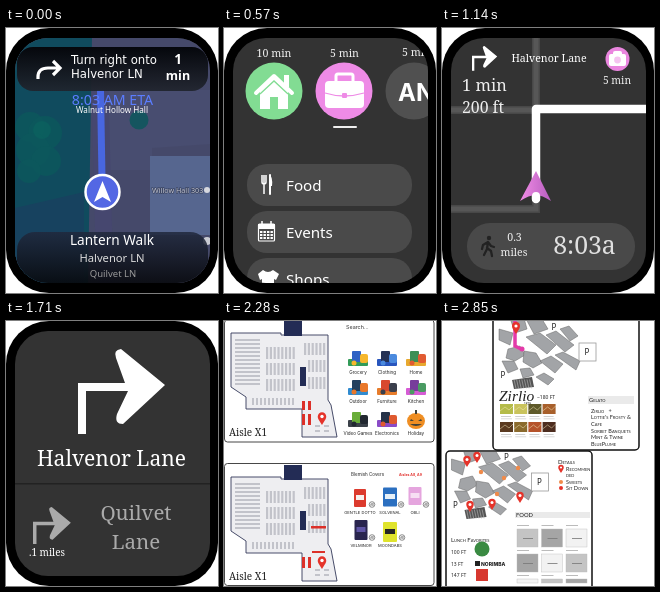
Recreate the animation shown at these times as an HTML page. Size 212 px wide and 265 px high, loop 3.42 s.

```html
<!DOCTYPE html>
<html lang="en">
<head>
<meta charset="utf-8">
<title>Wayfinding screens</title>
<style>
html, body { margin: 0; width: 100%; height: 100%; overflow: hidden; background: #fff; }
svg { display: block; width: 100vw; height: 100vh; }
text { white-space: pre; }
.serif { font-family: "Noto Serif", serif; }
.sans { font-family: "Noto Sans", sans-serif; }
.wide { font-family: "DejaVu Sans", sans-serif; }
.inter { font-family: Inter, sans-serif; }
.caps { font-family: Lato, sans-serif; font-variant: small-caps; }
.mid { text-anchor: middle; }
</style>
</head>
<body>
<svg id="stage" viewBox="0 0 212 265"></svg>
<script>
const HOLD = 570;
const text = (x, y, size, str, fill = '#fff', cls = '', extra = '') =>
  `<text x="${x}" y="${y}" font-size="${size}" fill="${fill}" class="${cls}" ${extra}>${str}</text>`;
const rect = (x, y, w, h, fill, r = 0, extra = '') =>
  `<rect x="${x}" y="${y}" width="${w}" height="${h}" rx="${r}" fill="${fill}" ${extra}/>`;
const circle = (x, y, r, fill, extra = '') =>
  `<circle cx="${x}" cy="${y}" r="${r}" fill="${fill}" ${extra}/>`;
const path = (d, fill, extra = '') => `<path d="${d}" fill="${fill}" ${extra}/>`;
const line = (d, stroke, width, extra = '') =>
  path(d, 'none', `stroke="${stroke}" stroke-width="${width}" ${extra}`);
const move = (x, y, body, scale = 1) =>
  `<g transform="translate(${x} ${y}) scale(${scale})">${body}</g>`;
const repeat = (n, draw) => Array.from({ length: n }, (_, i) => draw(i)).join('');
const round = 'stroke-linecap="round" stroke-linejoin="round"';

const watch = body => rect(0, 0, 212, 265, '#000', 43) +
  `<g clip-path="url(#screen)">${rect(9, 10, 195, 245, '#333')}${body}</g>`;

const turnArrow = (x, y, scale, fill) => move(x, y,
  path('M0 85V34H47L38 9Q35 1 43 0L87 36L45 75Q36 75 39 65L50 42H8V85Z', fill), scale);

const pin = (x, y, scale, fill = '#e5332a') => move(x, y,
  path('M0 0C-3-5-5-7-5-10A5 5 0 1 1 5-10C5-7 3-5 0 0Z', fill) + circle(0, -10, 2, '#fff'), scale);

function routeMap() {
  const trees = [[24, 99, 15], [39, 105, 17], [27, 122, 17], [40, 133, 15], [23, 143, 12], [133, 92, 9.5]];
  return watch(
    rect(9, 8, 195, 250, '#45496a') +
    path('M9 8H86L82 258H9Z', '#104b5e') +
    path('M9 180L78 164V258H9Z', '#17425f') +
    path('M101 62H204V116L146 120V142H101Z', '#484d70') +
    path('M144 128H204V207H144Z', '#56668f') +
    trees.map(([x, y, r]) => circle(x, y, r, '#0c575c', 'opacity=".85"')).join('') +
    circle(36, 102, 9, '#0a6460', 'opacity=".6"') +
    line('M94 62L99 258', '#46476f', 17) +
    line('M94.5 62L96 150', '#4866e0', 7) +
    rect(11, 19, 191, 44, 'url(#top)', 16) +
    line('M32 51V49Q32 40 42 40H53M47 33L54 40L47 47', '#fff', 3.2) +
    text(65, 36, 11.7, 'Turn right onto', '#fff', 'wide') +
    text(65, 50, 11.7, 'Halvenor LN', '#fff', 'wide') +
    text(172, 36, 13.5, '1', '#fff', 'sans mid', 'font-weight="700"') +
    text(172, 52, 12.5, 'min', '#fff', 'sans mid', 'font-weight="700"') +
    text(106.5, 76.5, 14.2, '8:03 AM ETA', '#5b7dff', 'sans mid') +
    text(106, 85, 8.1, 'Walnut Hollow Hall', '#fff', 'sans mid') +
    circle(96.5, 164, 17, '#5367e4', 'stroke="#fff" stroke-width="2.5"') +
    path('M96.5 153L105 174L96.5 169L88 174Z', '#fff') +
    text(146, 165, 7.2, 'Willow Hall 303', '#c5c9d8', 'sans', 'stroke="#333b55" stroke-width="1.2" paint-order="stroke"') +
    circle(201, 162, 3, '#d6d8df') + circle(201, 213, 4, '#c8cad2') +
    rect(11, 204, 191, 53, 'url(#bottom)', 18) +
    text(106, 216.5, 13.6, 'Lantern Walk', '#fff', 'sans mid') +
    text(106, 234, 11.2, 'Halvenor LN', '#ddd', 'sans mid') +
    text(107, 249, 9.5, 'Quilvet LN', '#999', 'sans mid'));
}

function categories() {
  const item = (y, label) => rect(23, y, 165, 42, '#4a4a4a', 20) +
    text(62, y + 27, 15.2, label, '#fff', 'sans');
  const house = path('M36 62L50 49L64 62V81H54V69H46V81H36Z', '#fff') +
    rect(60, 47, 5, 12, '#fff') + line('M32 65L50 48L68 65', '#fff', 4, round) +
    line('M36 66L50 53L64 66', '#82dc93', 1.3);
  const bag = rect(101, 53, 39, 27, '#fff', 4) +
    line('M112 53V48Q112 46 114 46H127Q129 46 129 48V53', '#fff', 3) +
    line('M101 65Q120 71 140 65', '#ee8be6', 1.3) + rect(118, 65, 5, 5, '#ee8be6', 1);
  const cutlery = line('M38 147V154Q38 156 40 156Q42 156 42 154V147M40 147V166', '#fff', 1.5) +
    line('M46 166V147', '#fff', 2, round) + path('M45 147Q49 148 48 158H45Z', '#fff');
  const calendar = rect(34.5, 196, 16, 17, 'none', 1, 'stroke="#fff" stroke-width="1.2"') +
    rect(34, 196, 17, 5, '#fff') + line('M38 193V198M47 193V198', '#fff', 1.5) +
    repeat(12, i => rect(36 + i % 4 * 3.5, 203 + (i >> 2) * 3, 2.4, 2, '#fff'));
  return watch(
    text(50, 28.5, 10.6, '10 min', '#eee', 'serif mid') +
    text(120.5, 28.5, 10.6, '5 min', '#eee', 'serif mid') +
    text(178, 27.5, 10.6, '5 min', '#eee', 'serif') +
    circle(50, 63, 28.5, '#82dc93') + circle(120, 63, 28.5, '#ee8be6') + circle(190, 63, 28.5, '#505050') +
    house + bag +
    text(174, 73, 24, 'AN', '#fff', 'inter', 'font-weight="700"') +
    rect(109, 98, 24, 2, '#eee', 1) +
    item(136, 'Food') + item(183, 'Events') + item(230, 'Shops') +
    cutlery + calendar +
    path('M39 242Q44 246 49 242L55 246L52 252L50 251V260H38V251L36 252L34 246Z', '#fff'));
}

function walking() {
  const road = 'M9 82H94M94 10V82M9 181H94V160';
  return watch(
    line(road, '#484848', 8) + line(road, '#575757', 5) +
    line('M94 171V81H204', '#fff', 8.5, round) +
    path('M94 143L109 173Q100 167 94 167Q87 167 78 173Z', 'url(#marker)') +
    rect(90, 164, 8, 10, '#fff', 4) +
    turnArrow(30, 18, .29, '#fff') +
    text(107, 34, 10.6, 'Halvenor Lane', '#fff', 'serif mid') +
    circle(175.5, 31, 12, '#ea86df') + rect(167, 26, 17, 12, '#fff', 2) +
    rect(171, 23, 9, 5, '#fff', 2) + circle(175.5, 32, 3.4, '#f5c4f0') +
    text(175, 55.5, 10.3, '5 min', '#eee', 'serif mid') +
    text(20, 63, 16.4, '1 min', '#eee', 'serif') +
    text(20, 85, 15.8, '200 ft', '#eee', 'serif') +
    rect(25, 195, 168, 47, '#494949', 23) +
    circle(47, 210, 2.2, '#222') +
    line('M46 214L45 221L42 227M45 220L49 223L50 228M46 214L41 217L40 221M46 214L49 218L52 219', '#222', 2.3, round) +
    text(72.5, 213, 10.6, '0.3', '#eee', 'serif mid') +
    text(72, 228, 10.5, 'miles', '#eee', 'serif mid') +
    text(142.5, 226, 24.8, '8:03a', '#e0e0e0', 'serif mid'));
}

function nextTurn() {
  return watch(
    turnArrow(72, 28, 1, '#fff') +
    text(105.5, 145, 21, 'Halvenor Lane', '#fff', 'serif mid') +
    rect(9, 162, 195, 1.5, '#222') +
    turnArrow(27, 186, .435, '#aaa') +
    text(41, 234.5, 9.9, '.1 miles', '#fff', 'serif mid') +
    text(130, 199, 20.5, 'Quilvet', '#aaa', 'serif mid') +
    text(130, 228, 20.5, 'Lane', '#aaa', 'serif mid'));
}

function storeMap(marks) {
  const upright = [[42, 26, 8, 12], [42, 42, 8, 12], [42, 58, 8, 12], [80, 22, 6, 12], [84, 39, 5, 12], [84, 56, 5, 12]];
  return path('M7 12H57V14H104V79L107 84L113 116H78V88H22V76L7 66Z', '#eeeef1',
      'stroke="#34395a" stroke-width=".9"') +
    rect(60, 0, 18, 15, '#232c55') + rect(76, 46, 6, 19, '#232c55') +
    upright.map(([x, y, n, h]) => repeat(n, i => rect(x + i * 3.8, y, 2.2, h, '#c2c3ca'))).join('') +
    repeat(12, i => rect(11, 18 + i * 4, 25, 2, '#c2c3ca')) +
    repeat(11, i => rect(28 + i * 4, 77, 2, 7, '#c2c3ca')) +
    repeat(4, i => rect(91 + i % 2 * 9, 104 + (i >> 1) * 5, 5, 2, '#c2c3ca')) +
    marks + pin(98, 104, .85) +
    text(5, 115, 10, 'Aisle X1', '#222', 'serif');
}

function store() {
  const frame = y => rect(.5, y, 209.5, 122, '#fff', 3, 'stroke="#333" stroke-width=".9"');
  const labels = ['Grocery', 'Clothing', 'Home', 'Outdoor', 'Furniture', 'Kitchen', 'Video Games', 'Electronics', 'Holiday'];
  const tones = ['#329b58 #2f62c4 #f6b72d', '#2855bd #263255 #4b8ade', '#e7a92f #3d8f55 #e15b32',
    '#308bd0 #24415f #e9782b', '#e77c2b #d8492e #3a3f4c', '#d65bd5 #773d9b #4a9b62',
    '#3b4149 #69ad39 #222831', '#8a4bc7 #263248 #df592f', '#ef8e23 #41433b #f6b13e'];
  const aisle = labels.map((label, i) => {
    const x = [134, 163, 192][i % 3], y = [38, 67, 99][i / 3 | 0];
    const [a, b, c] = tones[i].split(' ');
    const icon = i === 8
      ? `<ellipse cx="0" cy="1" rx="9" ry="8" fill="${a}"/>` + path('M-5-1L-2 1H-6ZM5-1L2 1H6ZM-6 4Q0 8 6 4Z', b) + rect(-1, -10, 2, 4, b)
      : rect(-10, 0, 20, 7, a, 1) + rect(-6, -8, 9, 11, b, 1) + rect(2, -5, 8, 9, c, 2) + circle(-4, 4, 2.5, c);
    return move(x, y, icon) + text(x, y + 15, 4.6, label, '#222', 'inter mid');
  }).join('');
  const product = (x, y, w, h, fill, accent, label, labelY, badgeX) =>
    rect(x - w / 2, y - h / 2, w, h, fill, 1) + rect(x - w / 2 + 2, y - 3, w - 4, 5, accent) +
    text(x, labelY, 4.1, label, '#222', 'inter mid') +
    circle(badgeX, labelY - 9, 2.8, '#fff', 'stroke="#444" stroke-width=".6"') +
    text(badgeX, labelY - 8, 2.8, 'A8', '#222', 'inter mid');
  const bar = (x, y, h) => rect(x, y, 3, h, '#dc3029');
  const lowerMarks = bar(78, 80, 9) + bar(84, 80, 9) + bar(78, 93, 11) + bar(84, 93, 11);
  const upperMarks = rect(87, 61, 15, 2.5, '#dc3029') + bar(78, 92, 11) + bar(84, 92, 11) + rect(88, 86, 13, 2, '#dc3029');
  return rect(0, 0, 212, 265, '#fff') + frame(-1) + frame(142.5) +
    storeMap(lowerMarks) + move(0, 144, storeMap(upperMarks)) +
    text(122, 8, 5.4, 'Search...', '#333', 'inter') + aisle +
    text(127, 154.5, 4.5, 'Blemish Covers', '#222', 'inter') +
    text(175, 154.5, 3.5, 'Aisles A8, A9', '#e12c28', 'inter', 'font-weight="700"') +
    product(136, 177, 12, 18, '#dc3b2e', '#f7f1ef', 'GENTLE DOTTO', 192.5, 148) +
    product(166, 176, 14, 19, '#2b6fc0', '#e6f0f8', 'SOLVENAL', 192.5, 177) +
    product(191, 175, 13, 18, '#e5a5de', '#f7dff3', 'OBLI', 192.5, 202) +
    product(137, 209, 13, 20, '#29254e', '#5f55a5', 'VELMINOR', 225.5, 148) +
    product(166, 211, 14, 20, '#dfe32c', '#252525', 'MOONDABS', 225.5, 178);
}

function mallMap() {
  const blocks = ['M57 8l14 4-3 12-11-5Z', 'M68-3h14l3 11-12 4Z', 'M84-2h16l6 10-14 5Z', 'M66 28l12-3 5 9-10 6-9-3Z',
    'M84 16l14-4 16 12-9 9Z', 'M104 14l10-4 18 14-9 7Z', 'M118 8l9-3 9 10-8 5Z', 'M82 30l12 2 6 10-9 5-10-6Z',
    'M60 40h12l4 8-10 4Z', 'M78 48l10-1 4 7-11 3Z', 'M98 40l11-5 12 8-8 9Z', 'M113 34l8-3 17 9-4 9Z',
    'M94 56l8-4 10 6-6 6Z'];
  return blocks.map(d => path(d, '#a2a4a7', 'stroke="#666" stroke-width=".5"')).join('') +
    path('M70 59L90 56L92 66L72 68Z', '#555') +
    repeat(7, i => line(`M${72 + i * 2.6} 58.5l2 9`, '#bbb', .6)) +
    rect(137, 22, 17, 18, '#fff', 0, 'stroke="#999" stroke-width=".8"') +
    [[61, 57], [112, 9], [145, 34]].map(([x, y]) => text(x, y, 8, 'P', '#222', 'sans mid')).join('');
}

function mall() {
  const ink = '#222';
  const caps = (x, y, size, str) => text(x, y, size, str, ink, 'caps');
  const panel = (y, x, h) => rect(x, y, 146, h, '#fff', 4, 'stroke="#111" stroke-width="1.5"');
  const flavours = ['#b4bb49', '#c9c35c', '#5f5a2a', '#a8602c', '#5a3a20', '#8a6a2d', '#b5532b', '#4d2d1f'];
  const cards = flavours.map((fill, i) => {
    const x = 58 + i % 4 * 14.2, y = 83 + (i >> 2) * 18;
    return rect(x, y, 13, 10, fill) + line(`M${x} ${y + 7}l5-4 4 3 4-4`, '#f4e8b8', 1, 'opacity=".5"') +
      rect(x + 1, y + 12, 10, .7, '#bbb') + rect(x + 1, y + 14.5, 11, .7, '#ccc');
  }).join('');
  const shops = ['Zirlio   +', "Lottie's Frosty &amp;", 'Cafe', 'Sorbet Banquets', 'Mint &amp; Twine', 'BluePlume'];
  const meals = repeat(9, i => {
    const x = 75 + i % 3 * 24.5, y = 208 + (i / 3 | 0) * 25;
    const tone = ['#c4c4c4', '#a5a5a5', '#f2f2f2'][(i + (i / 3 | 0)) % 3];
    return rect(x, y, 21, i > 5 ? 4 : 18, tone, 0, 'stroke="#bbb" stroke-width=".4"') +
      rect(x + 6, y + 9, 10, i > 5 ? 0 : .8, '#777') + rect(x, y - 4, 12, .8, '#aaa');
  });
  return rect(0, 0, 212, 265, '#fff') + panel(-5, 51, 134) + panel(130, 4, 140) +
    `<g clip-path="url(#upper)">${mallMap()}</g>` +
    line('M73 0V25L79 28', '#e33aa9', 3.5) + pin(74, 13, .8) + circle(80, 28, 2.5, '#e33aa9') +
    text(57, 80, 15.5, 'Zirlio', ink, '', 'font-family="Liberation Serif, serif" font-style="italic"') +
    text(82, 84, 3.2, '1878', ink, 'serif') + text(95, 78, 5, '~180 FT', ink, 'sans') + cards +
    rect(146, 75, 46, 8, '#eaeaea') + caps(147, 81, 5.8, 'Gelato') +
    shops.map((name, i) => caps(149, 91.5 + i * 6.7, 5.5, name)).join('') +
    `<g clip-path="url(#lower)">${move(-47.5, 130, mallMap())}</g>` +
    [[25, 146], [35, 142], [28, 191], [50, 189], [78, 182]].map(([x, y]) => pin(x, y, .75)).join('') +
    [[39, 151], [62, 157], [76, 147], [55, 173]].map(([x, y]) => circle(x, y, 2.2, '#f08a49')).join('') +
    caps(116, 143, 6, 'Details') +
    ['Recommen', 'ded', 'Sweets', 'Sit Down'].map((s, i) => caps(124, 150 + i * 6.3, 5.5, s)).join('') +
    pin(119, 152, .55) + circle(119, 161, 2, '#f08a49') + circle(119, 167, 2, '#e5332a') +
    rect(73, 191, 75, 6, '#eaeaea') + caps(74, 196, 5.8, 'FOOD') + meals +
    caps(9, 221, 6, 'Lunch Favorites') +
    ['100 FT', '13 FT', '147 FT'].map((s, i) => text(9, 233 + i * 11.7, 5, s, ink, 'sans')).join('') +
    circle(40, 228, 7.5, '#3a8a42') +
    rect(33, 240, 5, 5, '#222') +
    text(39, 245, 5, 'NORIMBA', ink, 'inter', 'font-weight="800"') +
    rect(34, 248, 12, 12, '#d7382f');
}

const defs = `<defs>
  <clipPath id="screen"><rect x="9" y="10" width="195" height="245" rx="33"/></clipPath>
  <clipPath id="upper"><rect x="52" y="0" width="144" height="70"/></clipPath>
  <clipPath id="lower"><rect x="5" y="131" width="110" height="69"/></clipPath>
  <linearGradient id="top" x2="0" y2="1"><stop stop-color="#05070c"/><stop offset="1" stop-color="#20242d" stop-opacity=".92"/></linearGradient>
  <linearGradient id="bottom" x2="0" y2="1"><stop stop-color="#20283c" stop-opacity=".85"/><stop offset="1" stop-color="#06070a" stop-opacity=".9"/></linearGradient>
  <linearGradient id="marker" x2="1"><stop stop-color="#f08be5"/><stop offset="1" stop-color="#b85fc0"/></linearGradient>
</defs>`;

const stage = document.getElementById('stage');
stage.innerHTML = defs + [routeMap, categories, walking, nextTurn, store, mall]
  .map(draw => `<g class="scene">${draw()}</g>`).join('');
const scenes = [...stage.querySelectorAll('.scene')];
const start = performance.now();

function tick() {
  const current = Math.floor((performance.now() - start) / HOLD) % scenes.length;
  scenes.forEach((scene, i) => { scene.style.display = i === current ? '' : 'none'; });
  requestAnimationFrame(tick);
}
tick();
</script>
</body>
</html>
```
